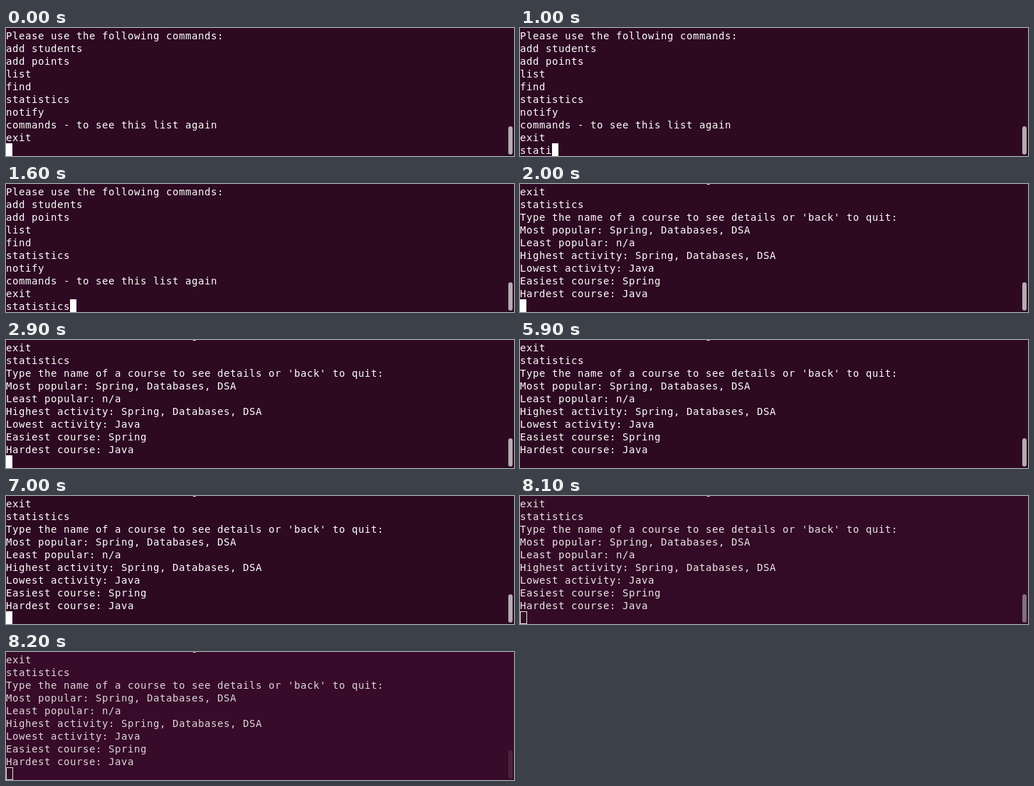
Recreate the animation shown at these times as an HTML page. Size 714x181 px, loop 8300 ms.

```html
<!DOCTYPE html>
<html lang="en">
<head>
<meta charset="utf-8">
<title>Terminal</title>
<style>
  html, body { margin: 0; width: 100%; height: 100%; overflow: hidden; }
  #term {
    position: relative; width: 714px; height: 181px; overflow: hidden;
    background: #2d0922; color: #fff;
  }
  #text {
    position: absolute; left: 0; top: 2px; margin: 0;
    font: 14px/18px "DejaVu Sans Mono", monospace;
    letter-spacing: calc(9px - 1ch); white-space: pre;
  }
  #cursor {
    position: absolute; left: 0; top: 163px; width: 9px; height: 18px;
    box-sizing: border-box; background: #fff;
  }
  #cursor.hollow { width: 10px; background: none; border: 1px solid #e6e0e4; }
  #thumb {
    position: absolute; left: 706px; top: 139px; width: 6px; height: 40px;
    border-radius: 3px; background: #b5acb2;
  }
</style>
</head>
<body>
<div id="term">
  <pre id="text"></pre>
  <div id="cursor"></div>
  <div id="thumb"></div>
</div>
<script>
const LOOP = 8300, ROW = 18, CELL = 9, TOP = 2;
const WORD = 'statistics';
const MENU = `Please use the following commands:
add students
add points
list
find
statistics
notify
commands - to see this list again
exit
`;
const REPORT = `Type the name of a course to see details or 'back' to quit:
Most popular: Spring, Databases, DSA
Least popular: n/a
Highest activity: Spring, Databases, DSA
Lowest activity: Java
Easiest course: Spring
Hardest course: Java`;

const KEYS = [400, 500, 700, 800, 1000, 1100, 1200, 1400, 1500, 1600];
const ENTER = 2000;
const BLINKS = [2300, 2900, 4000, 4100, 4700, 5300, 5900, 7000, 7100, 7700];
const LOOKS = [
  { at: 0, bg: '#2d0922', ink: '#ffffff', thumb: '#b5acb2', hollow: false },
  { at: 8100, bg: '#330b26', ink: '#ebe6e9', thumb: '#80707b', hollow: true },
  { at: 8200, bg: '#370b29', ink: '#ddd5da', thumb: '#4c2440', hollow: true }
];

const [term, text, cursor, thumb] =
  ['term', 'text', 'cursor', 'thumb'].map(id => document.getElementById(id));
const passed = (times, t) => times.filter(at => at <= t).length;
let shown = '';

function draw(t) {
  const typed = passed(KEYS, t);
  const done = t >= ENTER;
  const lit = passed(BLINKS, t) % 2 === 0;
  const step = passed(LOOKS.map(l => l.at), t) - 1;
  const state = [typed, done, lit, step].join();
  if (state === shown) return;
  shown = state;

  const look = LOOKS[step];
  text.textContent = MENU + WORD.slice(0, typed) + (done ? '\n' + REPORT : '');
  text.style.top = TOP - (done ? 8 * ROW : 0) + 'px';
  cursor.style.left = (done ? 0 : typed * CELL) + 'px';
  cursor.style.visibility = lit ? 'visible' : 'hidden';
  cursor.className = look.hollow ? 'hollow' : '';
  term.style.background = look.bg;
  term.style.color = look.ink;
  thumb.style.background = look.thumb;
}

const start = performance.now();
function tick() {
  draw((performance.now() - start) % LOOP);
  requestAnimationFrame(tick);
}
draw(0);
requestAnimationFrame(tick);
</script>
</body>
</html>
```
